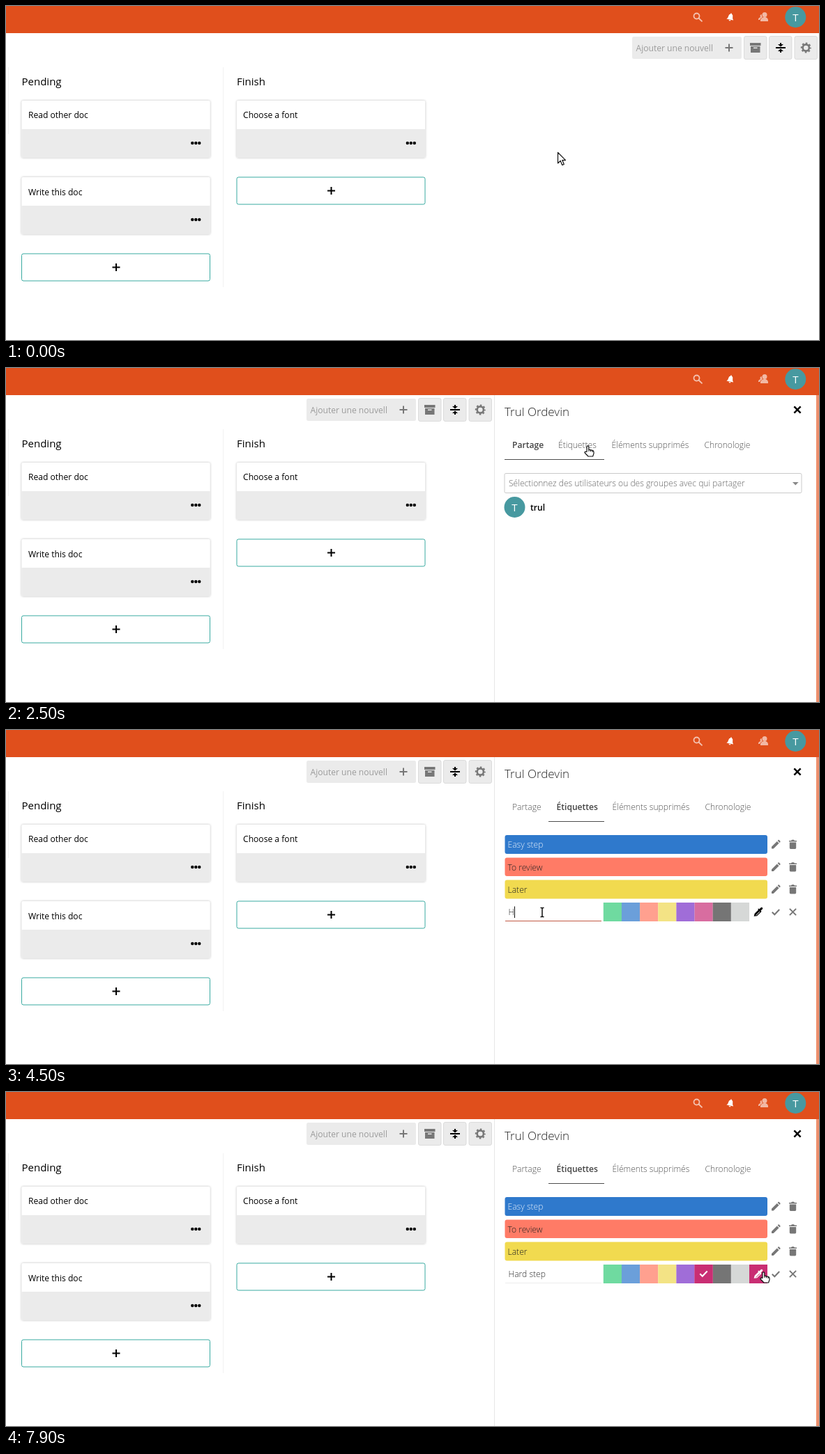
Write an HTML page that moves like this. It is 1166 px wide and 480 px high and loops after 8000 ms.

```html
<!DOCTYPE html>
<html lang="fr">
<head>
<meta charset="utf-8">
<title>Board labels</title>
<style>
  html, body { margin: 0; width: 100%; height: 100%; overflow: hidden; background: #fff; }
  svg { display: block; }
  text { font: 400 12.1px "Open Sans", "Noto Sans", sans-serif; white-space: pre; }
  .stack { font-size: 15px; }
  .title { font-size: 17px; font-weight: 300; fill: #222; }
  .light { font-weight: 300; }
  .bold { font-weight: 600; }
  .initial { font-size: 15px; fill: #fff; text-anchor: middle; }
  .tab { font-weight: 300; fill: #555; }
  .tab.on { font-weight: 600; fill: #444; }
  .btn { fill: #ebebeb; stroke: #dbdbdb; }
  .add { fill: #fff; stroke: #38aaa1; }
  .card { filter: drop-shadow(0 0 1.5px rgba(0, 0, 0, .28)); }
  .pointer { fill: #fff; stroke: #111; stroke-width: 1.2; stroke-linejoin: round; }
</style>
</head>
<body>
<svg width="1166" height="480" viewBox="0 0 1166 480">
  <defs>
    <path id="plus" d="M-5.5 0H5.5M0 -5.5V5.5" fill="none" stroke-width="2"/>
    <path id="cross" d="M-4.6 -4.6L4.6 4.6M4.6 -4.6L-4.6 4.6" fill="none"/>
    <path id="check" d="M-5.2 .2L-1.7 3.7L5.2 -3.4" fill="none" stroke-width="2.1"/>
    <path id="pencil" d="M-6 6v-2.8L1.8 -4.6l2.8 2.8L-3.2 6zM2.6 -5.4l1 -1q.6 -.5 1.2 0l1.6 1.6q.5 .6 0 1.2l-1 1z"/>
    <path id="trash" d="M-5.5 -5.5h3l1 -1.3h3l1 1.3h3v1.6h-11zM-4.7 -2.9h9.4v8q0 1.4 -1.4 1.4h-6.6q-1.4 0 -1.4 -1.4z"/>
    <g id="dropper">
      <path d="M-5.5 6l.8 -2.8L.8 -2.3l2.5 2.5L-2.2 5.7z" fill="none" stroke="currentColor" stroke-width="1.3"/>
      <path d="M-.8 -3.2l1.2 -1.2 1 1L3.6 -5.8q1.2 -1 2.2 0t0 2.2L3.5 -1.4l1 1 -1.2 1.2z" fill="currentColor"/>
      <path d="M-4.8 5L1.6 -1.4" stroke="currentColor" stroke-width="1.8"/>
    </g>
    <g id="card">
      <rect class="card" width="270.5" height="82" rx="2" fill="#fff"/>
      <path d="M0 41h270.5v39q0 2 -2 2h-266.5q-2 0 -2 -2z" fill="#ebebeb"/>
      <circle cx="245" cy="61" r="2.2"/><circle cx="250" cy="61" r="2.2"/><circle cx="255" cy="61" r="2.2"/>
    </g>
    <g id="addCard">
      <rect class="add" width="270" height="39" rx="2.5"/>
      <use href="#plus" x="135.5" y="19.5" stroke="#000"/>
    </g>
    <g id="avatar"><circle r="15" fill="#4799a0"/><text class="initial" y="5.5">T</text></g>
    <g id="row" fill="#777"><use href="#pencil" x="1104" y="0"/><use href="#trash" x="1128.5" y="0"/></g>
    <path id="arrow" class="pointer" d="M.5 .5V16L4.2 12.5 6.7 18.6 9.3 17.5 6.8 11.6H11.5Z"/>
    <g id="hand">
      <path class="pointer" d="M4 9.3V2.2a1.4 1.4 0 0 1 2.8 0V6.2L12 7.3q2 .5 2 2.4v2.2L12.6 16H6L1.2 11c-.8 -1.2 .6 -2.4 1.8 -1.5Z"/>
      <path d="M7 6v3M9.5 6.8V9.3M12 7.5V10" stroke="#111"/>
    </g>
    <g id="beam" fill="none">
      <path d="M-2.5 -6.5H-1L0 -5.5 1 -6.5H2.5M0 -5.5V5.5M-2.5 6.5H-1L0 5.5 1 6.5H2.5" stroke="#111" stroke-width="1.5"/>
    </g>
  </defs>

  <rect width="1166" height="480" fill="#fff"/>

  <!-- board -->
  <path d="M3.5 88V184M311.5 88V404" stroke="#f1f1f1"/>
  <text class="stack" x="22.5" y="114">Pending</text>
  <text class="stack" x="331" y="114">Finish</text>
  <use href="#card" x="22.3" y="136"/>
  <use href="#card" x="22.3" y="246"/>
  <use href="#card" x="330.8" y="136"/>
  <text x="32" y="161">Read other doc</text>
  <text x="32" y="271.5">Write this doc</text>
  <text x="340" y="161">Choose a font</text>
  <use href="#addCard" x="22.5" y="356"/>
  <use href="#addCard" x="331" y="246"/>

  <!-- side panel -->
  <g id="panel">
    <rect x="700" y="39" width="466" height="441" fill="#fff"/>
    <path d="M700.5 39V480" stroke="#e6e6e6"/>
    <rect x="1162" y="39" width="4" height="441" fill="#ee8f6c"/>
    <g id="spinner" fill="none" stroke-width="2">
      <circle r="14" stroke="#cbcbcb"/>
      <path d="M-9.9 -9.9A14 14 0 0 1 9.9 -9.9" stroke="#858585"/>
    </g>
    <g id="content">
      <text class="title" x="715" y="69">Trul Ordevin</text>
      <use href="#cross" x="1135" y="60" stroke="#000" stroke-width="2.5"/>
      <text class="tab" x="726" y="115">Partage</text>
      <text class="tab" y="115">Étiquettes</text>
      <text class="tab" y="115">Éléments supprimés</text>
      <text class="tab" y="115">Chronologie</text>
      <path id="underline" stroke="#4c4c4c"/>
      <g id="sharing">
        <rect x="715" y="151.5" width="426" height="28" rx="2" fill="#fff" stroke="#cacaca"/>
        <text class="light" x="721" y="170" fill="#666">Sélectionnez des utilisateurs ou des groupes avec qui partager</text>
        <path d="M1128 164h8.6l-4.3 4.5z" fill="#888"/>
        <use href="#avatar" x="729.5" y="200"/>
        <text class="bold" x="752" y="204.5">trul</text>
      </g>
      <g id="labels">
        <rect x="715.5" y="151" width="376.5" height="27" rx="3" fill="#2f79cc"/>
        <rect x="715.5" y="183.5" width="376.5" height="26.5" rx="3" fill="#ff7b66"/>
        <rect x="715.5" y="215.5" width="376.5" height="27" rx="3" fill="#f1da4f"/>
        <text class="light" x="719.5" y="169" fill="#e4eefa">Easy step</text>
        <text class="light" x="719.5" y="201.5" fill="#222">To review</text>
        <text class="light" x="719.5" y="233.5" fill="#222">Later</text>
        <use href="#row" y="164.5"/><use href="#row" y="197"/><use href="#row" y="229"/>
        <g id="create">
          <rect class="btn" x="716" y="249.5" width="211.5" height="30" rx="3"/>
          <use href="#plus" x="735" y="264.5" stroke="#777"/>
          <text class="bold" x="752" y="269" fill="#555">Créer une nouvelle étiquette</text>
        </g>
        <g id="form">
          <path id="field" d="M716 274.5H854"/>
          <text id="typed" class="light" x="720.5" y="266" fill="#333"></text>
          <path id="caret" d="M0 253.5V270" stroke="#111"/>
          <g id="swatches"></g>
          <g id="picked">
            <rect x="987.5" y="248" width="26.1" height="27" fill="#c92e73"/>
            <rect x="1066" y="248" width="26" height="27" fill="#c92e73"/>
            <use href="#check" x="1000.5" y="261" stroke="#fff"/>
          </g>
          <use id="dropperIcon" href="#dropper" x="1079" y="261"/>
          <use href="#check" x="1104" y="261.5" stroke="#777"/>
          <use href="#cross" x="1128.5" y="261.5" stroke="#777" stroke-width="2"/>
        </g>
      </g>
    </g>
  </g>

  <!-- board controls -->
  <g id="controls">
    <rect x="898" y="44" width="157" height="32" rx="2.5" fill="#ebebeb"/>
    <text x="903.5" y="64.5" fill="#9b9b9b">Ajouter une nouvell</text>
    <use href="#plus" x="1037" y="60" stroke="#777"/>
    <rect class="btn" x="1058.5" y="43.5" width="32.5" height="33" rx="2.5"/>
    <rect class="btn" x="1094.5" y="43.5" width="32.5" height="33" rx="2.5"/>
    <rect class="btn" id="gear" x="1131" y="43.5" width="32.5" height="33" rx="2.5"/>
    <path d="M1067 53h15.500v4h-15.500zM1068 58h13.500v9h-13.500zM1072 59.500v1.500h5.500v-1.500z" fill="#777" fill-rule="evenodd"/>
    <path d="M1104 59h14v2h-14zM1110 53h2v2h3l-4 3.500 -4 -3.500h3zM1110 67h2v-2h3l-4 -3.500 -4 3.500h3z"/>
    <g transform="translate(1147.300 60)" fill="none" stroke="#777">
      <circle r="4.600" stroke-width="2.600"/>
      <circle r="6.500" stroke-width="2" stroke-dasharray="2.600 2.505" stroke-dashoffset="1.300"/>
    </g>
  </g>

  <!-- header -->
  <rect width="1166" height="39" fill="#e04f1c"/>
  <g fill="none" stroke="#fff" stroke-width="1.800" opacity=".65">
    <circle cx="990.500" cy="14.500" r="4"/><path d="M993.500 17.500L998.500 22.300"/>
  </g>
  <g transform="translate(1039 16) rotate(12)" fill="#fff">
    <path d="M-5 3.500Q-3 2 -3 -1.500Q-3 -4 -1 -4.500Q0 -7 1 -4.500Q3 -4 3 -1.500Q3 2 5 3.500Z"/>
    <path d="M-1.800 4.300h3.600q-1.800 2.500 -3.600 0z"/>
  </g>
  <g fill="#fff" opacity=".6">
    <circle cx="1088" cy="12.500" r="3.500"/>
    <path d="M1082 22v-2.500q1 -2.500 4.500 -3.500h3q3 1 3.500 3.500V22z"/>
    <path d="M1079 20v-1.500q.8 -1.800 3 -2.400q-1.300 -3.800 1.600 -4.200q.2 3 1.600 4.100q-3.500 1.500 -4.200 4z"/>
  </g>
  <use href="#avatar" x="1132.300" y="16"/>

  <use id="cursor"/>
</svg>
<script>
const LOOP = 8000;
const $ = id => document.getElementById(id);
const show = (id, on) => $(id).setAttribute("display", on ? "inline" : "none");
const tabs = [...document.querySelectorAll(".tab")];

// time, x, y, and the shape when it changes
const moves = [
  [0, 791, 210, "arrow"], [100, 795, 214], [200, 815, 216], [300, 880, 200],
  [400, 960, 165], [500, 1015, 135], [600, 1037, 124],
  [800, 1050, 114], [900, 1090, 85], [1000, 1135, 56], [1100, 1153, 49],
  [1900, 1150, 52], [2000, 1135, 58], [2100, 1110, 72], [2200, 1030, 95],
  [2300, 930, 112], [2400, 850, 113, "hand"], [2500, 829, 111],
  [2800, 828, 118], [2900, 817, 143, "arrow"],
  [3100, 810, 188], [3200, 800, 215], [3300, 788, 235],
  [3400, 775, 252, "hand"], [3500, 766, 254], [3600, 761, 254],
  [3800, 761, 250, "arrow"], [4000, 767, 260, "beam"], [4100, 769, 262],
  [6400, 810, 272, "arrow"], [6500, 930, 288], [6600, 1027, 281],
  [6800, 1009, 258], [6900, 1006, 257], [7000, 1004, 257], [7100, 1002, 256],
  [7400, 1010, 257], [7500, 1030, 256], [7600, 1050, 256], [7700, 1068, 257],
  [7800, 1078, 258, "hand"], [7900, 1081, 258]
];
moves.forEach((m, i) => m[3] ??= moves[i - 1][3]);

const word = "Hard step";
const keyTimes = [4500, 4600, 4700, 4800, 5200, 5300, 5400, 5600, 5800];

const colors = ["#6fdaa0", "#6b9fda", "#ffa08f", "#f3e385", "#a06dd8", "#d86da0", "#757575", "#d6d8d7"];
$("swatches").innerHTML = colors.map((c, i) =>
  `<rect x="${856.8 + i * 26.15}" y="248" width="26.2" height="27" fill="${c}"/>`).join("");

function drawTabs(t) {
  const onLabels = t >= 2600;
  const hovering = t >= 2400 && t < 2600;
  const xs = onLabels ? [726, 789.5, 869.5, 1002.5] : [726, 792, 868.5, 1001.5];
  tabs.forEach((tab, i) => {
    tab.setAttribute("x", xs[i]);
    tab.classList.toggle("on", i === +onLabels);
  });
  const from = onLabels ? 778 : 715;
  const to = onLabels || hovering ? 858 : 781;
  $("underline").setAttribute("d", `M${from} 131.5H${to}`);
  show("sharing", !onLabels);
  show("labels", onLabels);
}

function drawForm(t) {
  const editing = t >= 3700;
  const picked = t >= 7300;
  show("create", !editing);
  show("form", editing);
  show("picked", picked);
  $("dropperIcon").setAttribute("color", picked ? "#fff" : "#000");
  $("field").setAttribute("stroke", picked ? "#ededed" : "#c25a45");
  $("typed").textContent = word.slice(0, keyTimes.filter(k => t >= k).length);
  const end = editing ? $("typed").getComputedTextLength() : 0;
  $("caret").setAttribute("transform", `translate(${Math.floor(721 + end) + .5} 0)`);
  show("caret", !picked && (t < 6400 || t >= 6900));
}

function draw(t) {
  const open = t >= 1300;
  const loaded = t >= 1900;
  show("panel", open);
  show("spinner", !loaded);
  show("content", loaded);
  const turn = (Math.floor(t / 100) * 100 - 1300) / 800 * 360;
  $("spinner").setAttribute("transform", `translate(928.7 156) rotate(${turn})`);
  $("controls").setAttribute("transform", `translate(${open ? -467 : 0} 0)`);
  $("gear").style.stroke = t >= 1000 && t < 2500 ? "#d2593a" : "";
  drawTabs(t);
  drawForm(t);
  const [, x, y, shape] = moves.findLast(m => m[0] <= t);
  $("cursor").setAttribute("href", "#" + shape);
  $("cursor").setAttribute("transform", `translate(${x} ${y})`);
}

const start = performance.now();
function tick() {
  draw((performance.now() - start) % LOOP);
  requestAnimationFrame(tick);
}
tick();
</script>
</body>
</html>
```
